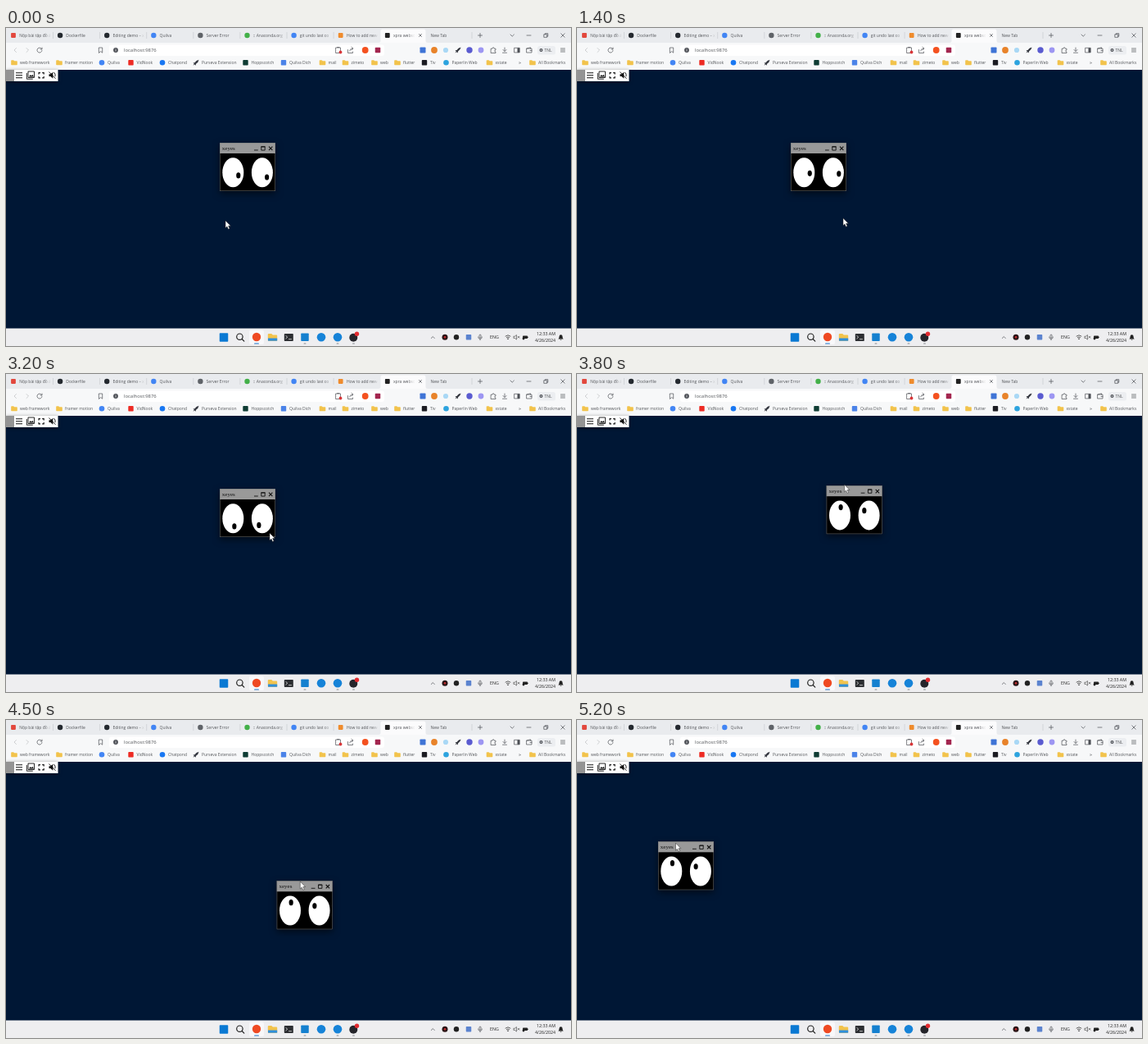
Recreate the animation shown at these times as an HTML page. Size 690 by 388 pixels, loop 5300 ms.

```html
<!DOCTYPE html>
<html lang="en">
<head>
<meta charset="utf-8">
<title>xeyes in the browser</title>
<style>
  html, body { margin: 0; width: 100%; height: 100%; overflow: hidden; background: #001735; }
  svg { display: block; width: 690px; height: 388px; }
  text { font-family: "Open Sans", "Noto Sans", sans-serif; font-size: 5px; fill: #55575b; white-space: pre; }
  .serif { font-family: "Liberation Serif", serif; font-size: 7px; fill: #111; }
  .line { fill: none; stroke: #4b4e54; stroke-width: .7; stroke-linecap: round; stroke-linejoin: round; }
  .bold { fill: none; stroke: #111; stroke-width: 1.1; }
  .thin { fill: none; stroke: #111; stroke-width: .9; }
  #tray { filter: drop-shadow(0 1px 2px rgba(0, 0, 0, .5)); }
  #win { filter: drop-shadow(0 3px 4px rgba(0, 0, 0, .55)); }
</style>
</head>
<body>
<svg viewBox="0 0 690 388" xmlns="http://www.w3.org/2000/svg">
  <defs>
    <linearGradient id="fade"><stop offset="0" stop-color="#e9ebee" stop-opacity="0"/><stop offset="1" stop-color="#e9ebee"/></linearGradient>
    <linearGradient id="fadeOn"><stop offset="0" stop-color="#fbfbfc" stop-opacity="0"/><stop offset="1" stop-color="#fbfbfc"/></linearGradient>
  </defs>
  <rect width="690" height="388" fill="#001735"/>

  <g id="chrome">
    <rect width="690" height="18" fill="#e9ebee"/>
    <rect y="18" width="690" height="33" fill="#f7f8f9"/>
    <path d="M455 18q2.500 0 2.500-2.500V4q0-2.500 2.500-2.500h50q2.500 0 2.500 2.500v11.500q0 2.500 2.500 2.500z" fill="#fbfbfc"/>
    <rect x="126" y="20.500" width="336" height="13.500" rx="3" fill="#fff"/>
    <rect x="649" y="22" width="22" height="10.500" rx="2.500" fill="#eceef1"/>
  </g>
  <g id="tabs"></g>
  <g id="bar"></g>
  <g id="marks"></g>

  <g id="tray">
    <rect y="51" width="63.500" height="14" fill="#fff"/>
    <rect y="51" width="10" height="14" fill="#bbb"/>
    <path d="M1 51v14M3 51v14M5 51v14M7 51v14M9 51v14" stroke="#666" stroke-width=".9"/>
    <path class="bold" d="M12 54.700h8M12 57.700h8M12 60.700h8"/>
    <path class="thin" d="M27 53h7.500v7.500H27zM25.300 55v7.200h7.500"/>
    <path d="M28 59.500l1.800-2.500 1.300 1.400 1.200-1.700 1.700 2.800z" fill="#111"/>
    <path class="bold" d="M40 56.500v-1.900h2M44.200 54.600h2v1.900M46.200 59v1.900h-2M42 60.900h-2V59"/>
    <path d="M52.500 56.300h2l2.800-2.600v8l-2.800-2.600h-2z" fill="#111"/>
    <path class="thin" d="M52.500 53.500l8 8.300M58.300 54q2.500 1.500 1.700 5.200"/>
  </g>

  <g id="win">
    <rect width="68" height="59" fill="#000"/>
    <rect width="68" height="13" fill="#999"/>
    <rect x=".25" y=".25" width="67.500" height="58.500" fill="none" stroke="#777" stroke-width=".5"/>
    <text class="serif" x="2.800" y="9">xeyes</text>
    <path class="thin" d="M42 9h4.800M50.800 4.700h4.400v4.400h-4.400zM50.400 5h5.200"/>
    <path class="bold" d="M60 4.700l4.400 4.400M64.400 4.700L60 9.100"/>
    <ellipse cx="16.300" cy="36.200" rx="13" ry="18" fill="#fff"/>
    <ellipse cx="51.900" cy="36.200" rx="13" ry="18" fill="#fff"/>
    <ellipse class="pupil" rx="2.600" ry="3.600"/>
    <ellipse class="pupil" rx="2.600" ry="3.600"/>
  </g>

  <g id="taskbar"></g>
  <path id="cursor" d="M0 0v9l2-1.800 1.500 3.300 1.600-.7-1.500-3.200h2.800z" fill="#fff" stroke="#222" stroke-width=".5" stroke-linejoin="round"/>
</svg>

<script>
const $ = id => document.getElementById(id);
const text = (x, y, s, more = '') => `<text x="${x}" y="${y}" ${more}>${s}</text>`;
const dot = (x, y, c, r = 3.3) => `<circle cx="${x}" cy="${y}" r="${r}" fill="${c}"/>`;
const box = (x, y, c, w = 6.4, h = w) =>
  `<rect x="${x - w / 2}" y="${y - h / 2}" width="${w}" height="${h}" rx=".8" fill="${c}"/>`;
const line = (d, more = '') => `<path class="line" d="${d}" ${more}/>`;
const folder = (x, y, k = 1) =>
  `<path transform="translate(${x} ${y}) scale(${k})" d="M-3.800-2.300q0-.7.700-.7h2.300l1 1h2.900q.7 0 .7.700v3.600q0 .7-.7.700h-6.200q-.7 0-.7-.7z" fill="#f2c34c"/>`;
const rocket = (x, y) =>
  `<path transform="translate(${x} ${y})" d="M3.500-3.500Q0-3-1.500 0l-2 .3 1.300 1.200-1.300 2 2-1.300L-.3 3.500 0 1.500Q3-.2 3.500-3.500z" fill="#353840"/>`;

// Tabs
const tabs = [
  ['Nộp bài tập đồ án', '#e2483d', box], ['Dockerfile', '#24292f', dot],
  ['Editing demo – x', '#24292f', dot], ['Quilva', '#4285f4', dot],
  ['Server Error', '#5f6368', dot], [':: Anaconda.org', '#43b049', dot],
  ['git undo last co', '#4285f4', dot], ['How to add new', '#ef8b2c', box],
  ['xpra webso', '#222', box],
];
$('tabs').innerHTML = tabs.map(([name, color, mark], i) => {
  const x = 9 + i * 57.1, on = i === 8;
  const cut = on ? 23 : 36;
  return mark(x, 9, color, mark === dot ? 3.2 : 5.8)
    + `<svg x="${x + 7}" y="0" width="${cut + 3}" height="18">${text(0.2, 10.800, name)}</svg>`
    + `<rect x="${x + cut + 2}" y="4" width="8" height="10" fill="url(#${on ? 'fadeOn' : 'fade'})"/>`
    + (i < 7 ? `<path d="M${x + 48.500} 5v8" stroke="#c3c6cc" stroke-width=".6"/>` : '');
}).join('')
  + text(518.500, 10.800, 'New Tab')
  + line('M504.500 7.500l3 3m0-3l-3 3M579 6.500v5M576.500 9h5M616 8l2.200 2.200L620.400 8M636 9h5M657.200 7.800h3.500v3.500h-3.500zM658.300 7.800v-1.100h3.500v3.500h-1.100M677.800 6.800l4.400 4.400m0-4.400l-4.400 4.400')
  + '<path d="M569 5v8" stroke="#c3c6cc" stroke-width=".6"/>';

// Address row
$('bar').innerHTML =
  line('M12.500 24.500L10 27l2.500 2.500M25 24.500l2.500 2.500-2.500 2.500', 'opacity=".35"')
  + line('M43.600 25.500a3 3 0 1 0 .4 2M44 24v2h-2M113.700 24h4v6.200l-2-1.700-2 1.700z')
  + dot(134, 27, '#4b4e54', 2.900)
  + '<path d="M134 26.500v2M134 25.100v.7" stroke="#fff" stroke-width=".8"/>'
  + text(144, 29, 'localhost:9876', 'style="font-size:5.900px"')
  + line('M403 24h5.500v6.500H403zM404.500 23.500h2.500M417.500 26.500v4h6v-1.500M419.500 28q.5-3 4-3M422 23.300l2 1.700-2 1.700')
  + dot(408.500, 29.500, '#d8373a', 1.900)
  + dot(438.700, 27, '#f4511f', 3.900) + box(454, 27, '#a3264f', 6.500)
  + box(509, 27, '#3f74d6', 7) + dot(523, 27, '#e8832a', 3.900) + dot(537, 27, '#a9d8f5', 3.100)
  + rocket(552, 27) + dot(566, 27, '#5a5bd0', 3.700) + dot(580, 27, '#9d96f2', 3.400)
  + line('M592.500 25.200h1.500q0-1.500 1.100-1.500t1.100 1.500h1.800v1.700q-1.300 0-1.300 1.100t1.300 1.100v1.400h-5.500z')
  + line('M609 24v4.200M607 26.500l2 2 2-2M606.500 30.200h5M621 24.300h6.200v5.600H621zM636 25h6v5h-6zM636 25l4.500-1.200V25M640 27.500h2')
  + '<path d="M624.500 24.300h2.700v5.600h-2.700z" fill="#4b4e54"/>'
  + dot(653.500, 27, '#4b4e54', 2) + dot(653.500, 27, '#eceef1', .8)
  + text(657.500, 28.900, 'TNL')
  + line('M677.500 25h5M677.500 27h5M677.500 29h5');

// Bookmarks: icon centre, label, icon
const fold = (x, y) => folder(x, y);
const spot = (c, mark = dot) => (x, y) => mark(x, y, c);
const marks = [
  [10, 'web framework', fold], [65, 'framer motion', fold], [117, 'Quilva', spot('#4285f4')],
  [152.500, 'VidNook', spot('#ed2b24', box)], [191, 'Chatpond', spot('#1877f2')],
  [232, 'Purseva Extension', rocket], [292.500, 'Hoppscotch', spot('#0f3d34', box)],
  [339, 'Quilva Dich', spot('#4b83e8', box)], [386.500, 'mail', fold], [414.500, 'zimeto', fold],
  [450, 'web', fold], [478, 'flutter', fold], [511, 'Tiv', spot('#1c1c22', box)],
  [537.500, 'Paperlin Web', spot('#2ca3de')], [590.500, 'xstate', fold], [643, 'All Bookmarks', fold],
];
$('marks').innerHTML = marks.map(([x, name, icon]) => icon(x, 42.300) + text(x + 7, 44.200, name)).join('')
  + text(626, 44, '»', 'style="font-size:6px"');

// Desktop taskbar
const under = (x, w, c) => box(x, 385, c, w, 1.2);
$('taskbar').innerHTML = '<rect y="366.500" width="690" height="22" fill="#eeeef0"/>'
  + '<rect x="297" y="368.500" width="18" height="17.500" rx="2" fill="#f8f8fa"/>'
  + box(266, 377.500, '#0a79d3', 10.500)
  + '<circle cx="285.400" cy="376.700" r="3.700" fill="none" stroke="#222" stroke-width="1.200"/>'
  + line('M288.200 379.500l2.600 2.600', 'style="stroke:#222;stroke-width:1.200"')
  + dot(306, 377, '#ef4a23', 5.200) + folder(325.500, 377.500, 1.5)
  + '<path d="M320 378.500h11.200v3.200H320z" fill="#2f8fdc"/>'
  + box(345.300, 377.500, '#2b2d31', 11, 9)
  + line('M341.800 375.500l1.900 1.700-1.900 1.700M345.500 379.700h3', 'style="stroke:#fff"')
  + box(365, 377.300, '#1580cf', 9.500)
  + dot(385, 377.300, '#1683d8', 5.300) + dot(405, 377.300, '#1683d8', 5.300)
  + dot(424.300, 377.700, '#25252b', 5) + dot(428.500, 373.300, '#e22b30', 2.700)
  + under(306, 6, '#1a6fc4') + [365, 405, 424.5].map(x => under(x, 3, '#85888e')).join('')
  + line('M519.300 378.500l2-2 2 2')
  + dot(536, 377.300, '#2a1416', 3.500) + dot(536, 377.300, '#c52a2d', 1.200)
  + dot(550, 377.300, '#222', 3.200) + box(565, 377.300, '#5b83cf', 6.500)
  + line('M578 375q0-1 1-1t1 1v2.200q0 1-1 1t-1-1zM576.600 377q0 2.300 2.400 2.300t2.400-2.300M579 379.300v1.500')
  + text(591, 379.300, 'ENG', 'style="font-size:5.300px;fill:#222"')
  + line('M610 376q3-2.700 6 0M611.300 377.600q1.700-1.500 3.400 0', 'style="stroke:#222"') + dot(613, 379.300, '#222', .8)
  + line('M620.300 376.200h1.200l1.900-1.700v5.600l-1.900-1.700h-1.200zM625 376.200l2 2m0-2l-2 2', 'style="stroke:#333;stroke-width:.6"')
  + box(634, 377.300, '#222', 6, 3.600) + box(637.500, 377.300, '#222', .9, 1.6) + dot(632, 379, '#222', 1.400)
  + text(671, 375.300, '12:33 AM', 'text-anchor="end" style="font-size:5.300px;fill:#222"')
  + text(671, 382.700, '4/26/2024', 'text-anchor="end" style="font-size:5.300px;fill:#222"')
  + '<path d="M674.500 379.500q1.100-1 1.100-3 0-2.200 2-2.200t2 2.200q0 2 1.100 3zM676.600 380.100h2q-1 1.500-2 0z" fill="#222"/>';

// Motion: [ms, x, y]
const LOOP = 5300, STEP = 100, LAG = 150, GRAB = 3600;
const mousePath = [
  [-150, 360, 224], [0, 268, 235], [150, 197, 180], [400, 310, 86], [550, 370, 180],
  [700, 300.5, 226], [880, 209, 185], [1050, 275, 123], [1200, 368, 172], [1270, 380, 200],
  [1400, 325, 232], [1600, 204, 212], [1800, 345, 176], [1900, 387, 190], [2050, 338, 236],
  [2200, 232, 239], [2400, 290, 186], [2600, 376, 205], [2800, 262, 234], [2900, 240, 226],
  [3050, 286, 231], [3200, 322, 194], [3400, 302, 153], [3600, 282, 143],
];
const winPath = [
  [3600, 261, 140], [3750, 300, 144], [3880, 298, 122], [4000, 240, 130], [4100, 222.7, 142.3],
  [4200, 219, 156], [4320, 246, 184], [4500, 330.7, 196.3], [4620, 382, 170], [4800, 296, 119],
  [5000, 180, 120], [5200, 99, 148.3],
];

// Smooth curve through timed points
function along(path, t) {
  const last = path.length - 1;
  t = Math.min(Math.max(t, path[0][0]), path[last][0]);
  let i = 0;
  while (i < last - 1 && path[i + 1][0] <= t) i++;
  const slope = (k, c) => {
    const a = path[Math.max(k - 1, 0)], b = path[Math.min(k + 1, last)];
    return (b[c] - a[c]) / (b[0] - a[0]);
  };
  const p = path[i], q = path[i + 1], d = q[0] - p[0], u = (t - p[0]) / d, v = 1 - u;
  return [1, 2].map(c =>
    p[c] * v * v * (1 + 2 * u) + q[c] * u * u * (3 - 2 * u)
    + d * u * v * (slope(i, c) * v - slope(i + 1, c) * u));
}

const eyes = [[16.3, 36.2], [51.9, 36.2]];
const pupils = document.querySelectorAll('.pupil');
const move = (el, x, y) => el.setAttribute('transform', `translate(${x.toFixed(2)} ${y.toFixed(2)})`);

function draw(t) {
  const [wx, wy] = along(winPath, t);
  let tip, look;
  if (t < GRAB) {
    tip = along(mousePath, t);
    const [lx, ly] = along(mousePath, t - LAG);
    look = [lx - wx, ly - wy];
  } else {
    const [ax, ay] = along(winPath, t + 14);
    tip = [ax + 21.5, ay + 1.8];
    look = [20, 4.5];
  }
  move($('win'), wx, wy);
  move($('cursor'), ...tip);
  eyes.forEach(([ex, ey], i) => {
    const dx = look[0] - ex, dy = look[1] - ey;
    const k = 1 / Math.max(1, Math.hypot(dx / 7, dy / 10));
    move(pupils[i], ex + dx * k, ey + dy * k);
  });
}

const start = performance.now();
function tick() {
  const t = (performance.now() - start) % LOOP;
  draw(Math.floor(t / STEP) * STEP);
  requestAnimationFrame(tick);
}
tick();
</script>
</body>
</html>
```
